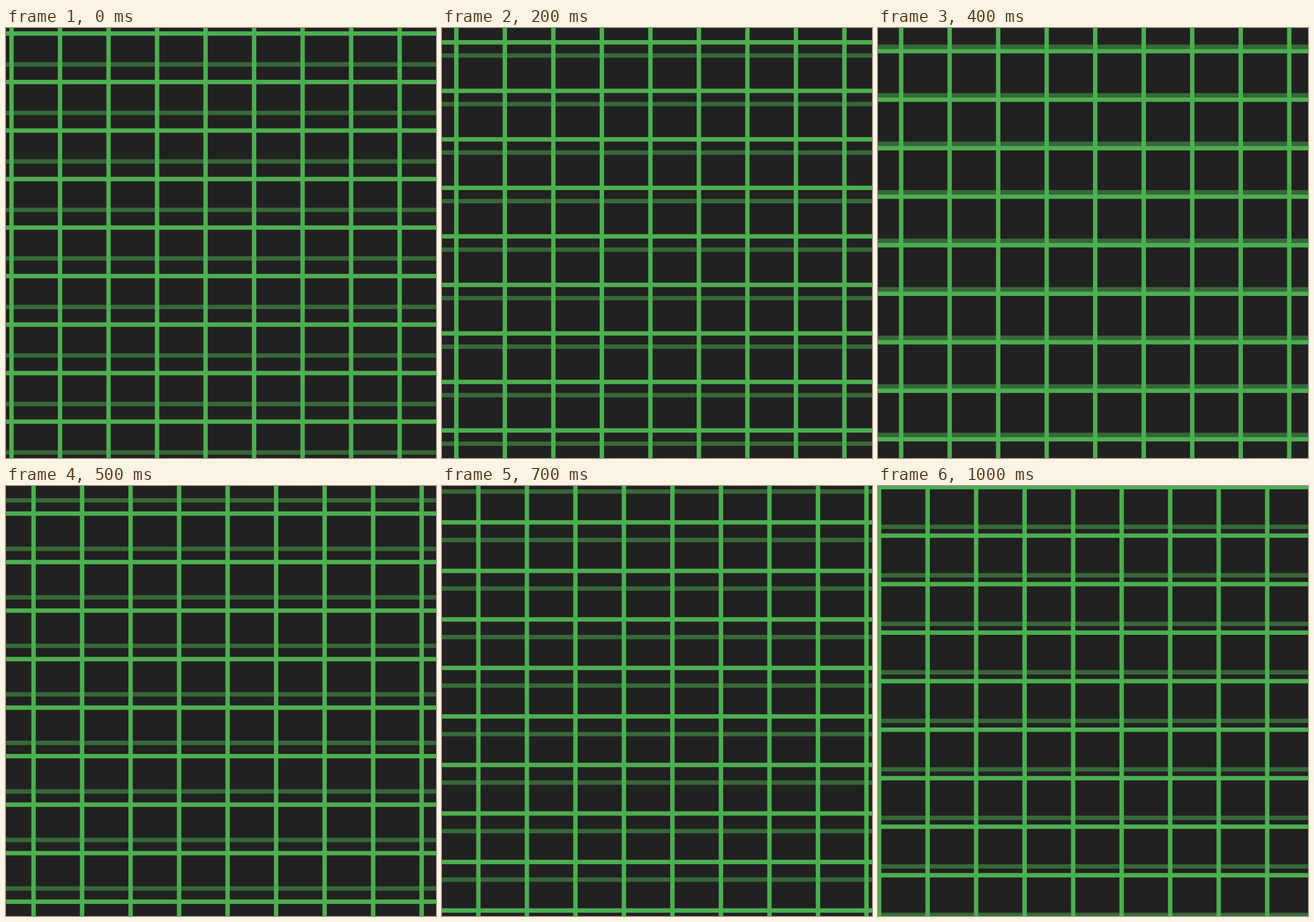
Animation of 748x748 px, one loop 1100 ms. Source, as an HTML page with a canvas:

```html
<!DOCTYPE html>
<html lang="en">
<head>
<meta charset="utf-8">
<title>Sliding grid</title>
<style>
  html, body { margin: 0; height: 100%; overflow: hidden; background: #212121; }
  canvas { display: block; }
</style>
</head>
<body>
<canvas width="748" height="748"></canvas>
<script>
const ctx = document.querySelector('canvas').getContext('2d');
const SIZE = 780, UNIT = 8, STEPS = 11, STEP_MS = 100;
const PERIOD = UNIT * STEPS, ORIGIN = -2;
ctx.scale(748 / SIZE, 748 / SIZE);

// Repeats a line every PERIOD, starting at the given unit slot.
function lines(slot, color, vertical) {
  ctx.fillStyle = color;
  const first = ORIGIN + (slot + STEPS) % STEPS * UNIT;
  for (let p = first; p < SIZE; p += PERIOD) {
    if (vertical) ctx.fillRect(p, 0, UNIT, SIZE);
    else ctx.fillRect(0, p, SIZE, UNIT);
  }
}

function draw(now) {
  const step = Math.floor(now / STEP_MS) % STEPS;
  ctx.fillStyle = '#212121';
  ctx.fillRect(0, 0, SIZE, SIZE);
  lines(8 - step, '#376839', false);
  lines(1 + step, '#4caf50', false);
  lines(1 + step, '#4caf50', true);
}

function tick() {
  draw(performance.now());
  requestAnimationFrame(tick);
}
tick();
</script>
</body>
</html>
```
